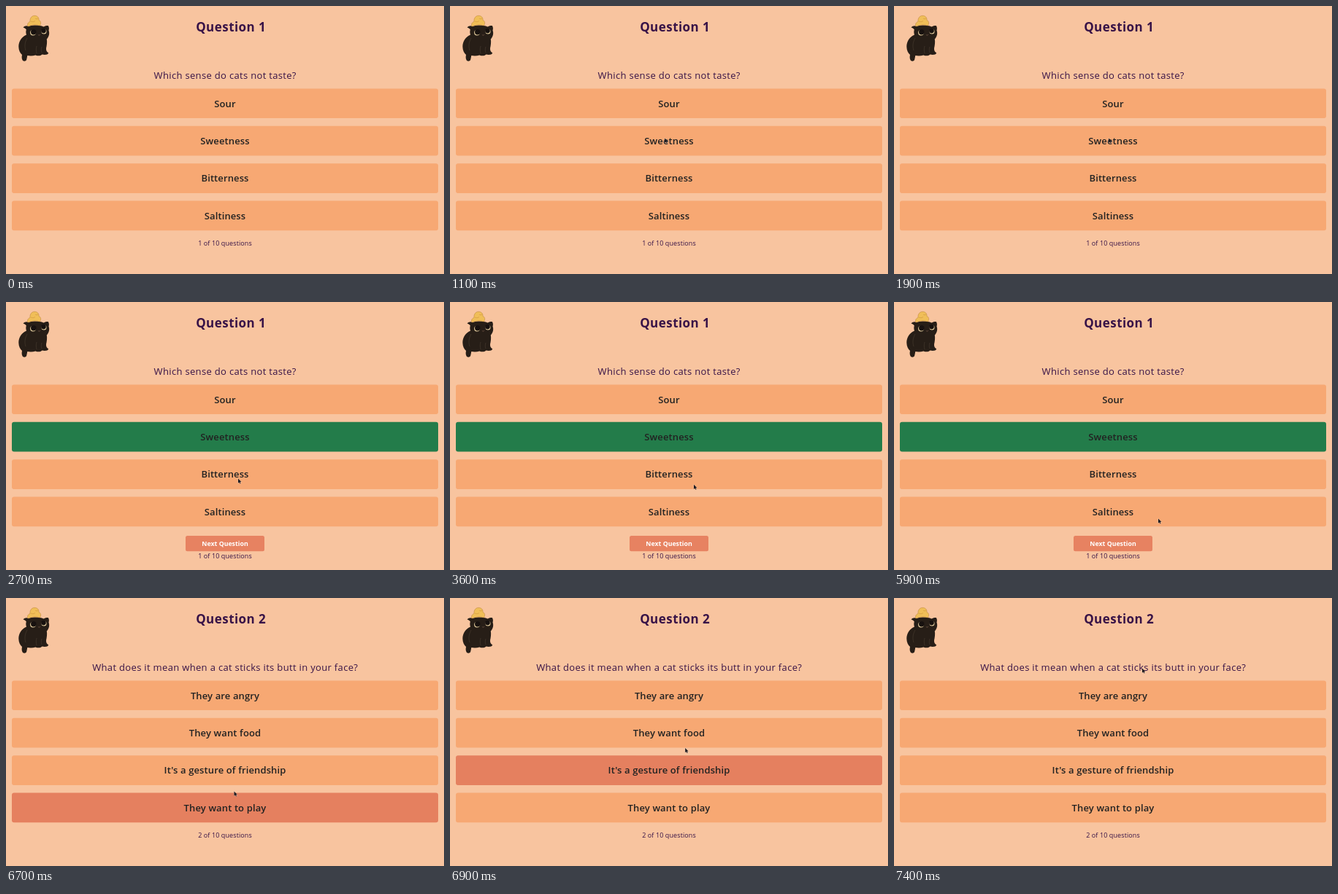
Write an HTML page that moves like this. It is 600 by 368 pixels and loops after 7.5 s.

```html
<!DOCTYPE html>
<html lang="en">
<head>
<meta charset="utf-8">
<title>Cat quiz</title>
<style>
  html, body { margin: 0; width: 100%; height: 100%; overflow: hidden; background: #f8c49f; }
  svg { display: block; width: 600px; height: 368px; }
  text { font-family: "Open Sans", sans-serif; text-anchor: middle; fill: #381347; }
  #title { font-size: 17px; font-weight: 700; letter-spacing: .45px; }
  #ask { font-size: 13px; font-weight: 500; letter-spacing: .33px; }
  #rows text { font-size: 13px; font-weight: 600; letter-spacing: .12px; fill: #222; }
  #count { font-size: 9px; letter-spacing: .1px; }
  #next text { font-size: 8.8px; font-weight: 700; fill: #fff; }
</style>
</head>
<body>
<svg viewBox="0 0 600 368">
  <rect width="600" height="368" fill="#f8c49f"/>

  <g id="cat">
    <path fill="#271e17" d="M31 28C28.500 26.500 25.500 27 23.500 29.500C25.500 30 27 31 27.800 32.500C27 35 27.300 37.500 28 39.500C21.500 42.500 17.200 48.500 17.300 56C17.400 61 19.300 64.500 22 67C21.300 70 21.500 73 23 75C25 76.500 28 75.800 28.300 73L29.300 68C33 68.800 37 68.600 40.500 67.500C43.500 69 47.500 68.500 49.500 66.500C53 67.500 57.500 67 58.300 64.500C56.500 63.500 54.600 61.500 55 58C56 53.500 56.500 49 55.800 45.500C59 42 60 37.500 58.500 33.500C59.300 31 59 29 57.800 27C55.500 26.600 53 27.400 51.500 28.500C46 26 37 26 31 28Z"/>
    <path fill="none" stroke="#463a2e" stroke-width=".7" d="M29 44C26 49 25 55 27 61M42 55C41 58 41 62 42 65M49 56C48 59 48 62 49 64"/>
    <g fill="#e6cf9f">
      <circle cx="37" cy="36.600" r="3.900"/>
      <circle cx="52" cy="35" r="3.500"/>
    </g>
    <g fill="#17110f">
      <circle cx="37.700" cy="35.700" r="3.700"/>
      <circle cx="51.500" cy="34.100" r="3.300"/>
    </g>
    <path fill="none" stroke="#7a5a4b" stroke-width=".7" d="M44 39.500L45.500 40.300L47 39.200"/>
    <path fill="#f0be58" stroke="#b68036" stroke-width=".5" d="M30 28C28.500 25 30.500 22 33 21.500C32.500 17 35 13.300 39 13.300C43 13.300 45.500 16 45 19.500C48 20.500 48.300 24 46.500 27C41 25.300 35 25.800 30 28Z"/>
    <path fill="none" stroke="#d39a40" stroke-width=".7" d="M34 21C36 22 38 22 40 20.500M40 17C41 18 43 18 44 17"/>
  </g>

  <text id="title" x="308.200" y="34.600"></text>
  <text id="ask" x="300.200" y="100.200"></text>
  <g id="rows"></g>
  <g id="next">
    <rect x="246" y="321" width="108" height="21.300" rx="2.500" fill="#e78261"/>
    <text x="300" y="335.200">Next Question</text>
  </g>
  <text id="count" x="300" y="329.300"></text>
  <path id="cursor" d="M0 0V6.200L1.500 4.900L2.500 7L3.500 6.600L2.500 4.600H4.400Z" fill="#1d1a20" stroke="#f5dccb" stroke-width=".5" paint-order="stroke"/>
</svg>

<script>
const LOOP = 7500, STEP = 100;
const ANSWERED = 2000, ADVANCED = 6400, HOVER_LAG = 100;
const ROW = { x: 8, y: 113.4, w: 584, h: 40.7, pitch: 51.4 };
const COLOR = { idle: '#f7a873', hover: '#e5805f', right: '#237c4a' };

const quiz = [
  { ask: 'Which sense do cats not taste?',
    options: ['Sour', 'Sweetness', 'Bitterness', 'Saltiness'], right: 1 },
  { ask: 'What does it mean when a cat sticks its butt in your face?',
    options: ['They are angry', 'They want food', "It's a gesture of friendship", 'They want to play'] }
];

// time, x, y of the pointer tip
const path = [
  [300, 302, 236], [1000, 294, 181.5], [1900, 294, 181.5], [2700, 318, 242.5],
  [4500, 350, 259], [5900, 362, 297.5], [6200, 338, 329], [6400, 330, 330],
  [6700, 312.5, 265.5], [7200, 340, 96.5], [7500, 340, 96.5]
];

const $ = id => document.getElementById(id);

function make(tag, attrs, parent) {
  const el = document.createElementNS('http://www.w3.org/2000/svg', tag);
  for (const key in attrs) el.setAttribute(key, attrs[key]);
  return parent.appendChild(el);
}

const rows = quiz[0].options.map((_, i) => {
  const y = ROW.y + i * ROW.pitch;
  const box = make('rect', { x: ROW.x, y, width: ROW.w, height: ROW.h, rx: 3 }, $('rows'));
  const label = make('text', { x: 300, y: y + 25.1 }, $('rows'));
  return { y, box, label };
});

function pointer(t) {
  const i = Math.max(1, path.findIndex(p => p[0] > t));
  const [t0, x0, y0] = path[i - 1], [t1, x1, y1] = path[i];
  const u = Math.min(1, Math.max(0, (t - t0) / (t1 - t0)));
  const k = u * u * (3 - 2 * u);
  return { x: x0 + (x1 - x0) * k, y: y0 + (y1 - y0) * k };
}

function draw(t) {
  const n = t < ADVANCED ? 0 : 1;
  const page = quiz[n];
  const answered = n === 0 && t >= ANSWERED;
  const tip = pointer(t), felt = pointer(t - HOVER_LAG);

  $('title').textContent = 'Question ' + (n + 1);
  $('ask').textContent = page.ask;
  $('count').textContent = (n + 1) + ' of 10 questions';
  $('count').setAttribute('y', answered ? 352.4 : 329.3);
  $('next').style.display = answered ? '' : 'none';

  rows.forEach((row, i) => {
    const over = n === 1 && felt.y >= row.y && felt.y <= row.y + ROW.h;
    const color = answered && i === page.right ? COLOR.right : over ? COLOR.hover : COLOR.idle;
    row.box.setAttribute('fill', color);
    row.label.textContent = page.options[i];
  });

  $('cursor').style.display = t < path[0][0] ? 'none' : '';
  $('cursor').setAttribute('transform', `translate(${tip.x} ${tip.y})`);
}

const start = performance.now();
function tick() {
  const t = (performance.now() - start) % LOOP;
  draw(Math.floor(t / STEP) * STEP);
  requestAnimationFrame(tick);
}
tick();
</script>
</body>
</html>
```
